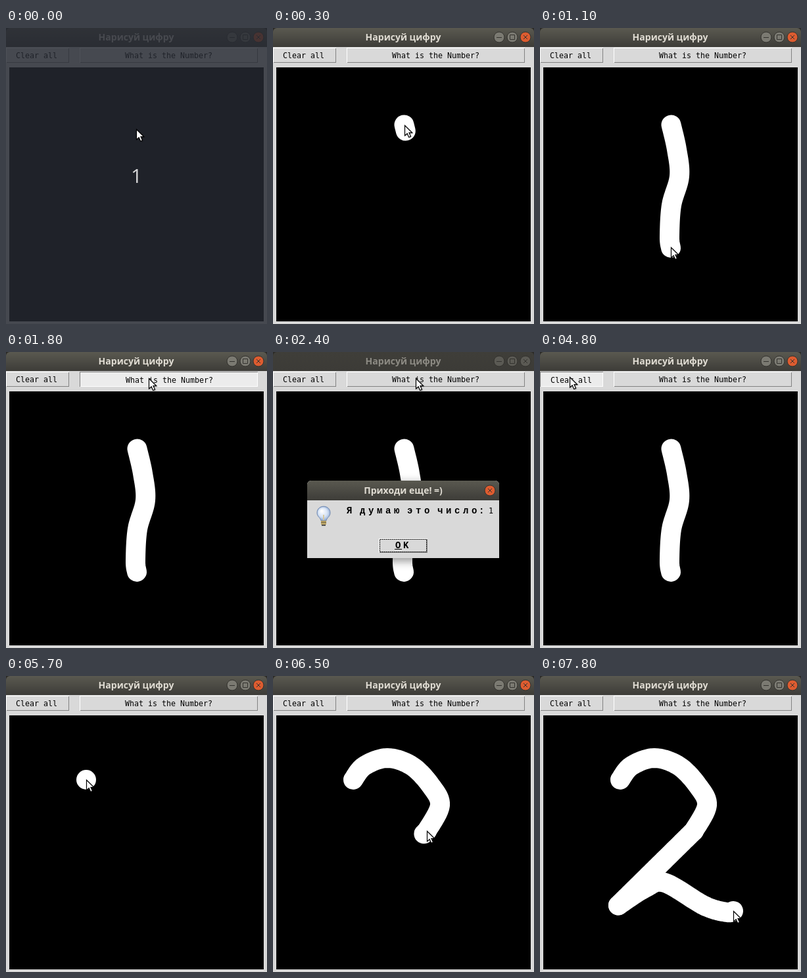
These frames come from a looping animation (397 by 451 pixels, 8 s). An HTML page with a canvas:

```html
<!DOCTYPE html>
<html lang="ru">
<head>
<meta charset="utf-8">
<style>
  html, body { margin: 0; width: 100%; height: 100%; overflow: hidden; background: #d9d9d9; }
  canvas { display: block; }
</style>
</head>
<body>
<canvas id="stage" width="397" height="451"></canvas>
<script>
const ctx = document.getElementById('stage').getContext('2d');
const LOOP = 8000, STEP = 100, CURSOR_LAG = 100;
const ASK_DOWN = 1800, DIALOG_OPEN = 2300, OK_DOWN = 3500, DIALOG_CLOSE = 3700;
const CLEAR_DOWN = 4800, CLEARED = 5000;
const PANEL = '#d9d9d9', HOVER = '#ececec', BRUSH = 30;
const TITLE_FONT = 'bold 14px "Open Sans", "Noto Sans", sans-serif';
const BUTTON_FONT = '11.63px "DejaVu Sans Mono", monospace';
const MESSAGE_FONT = 'bold 14px "Liberation Mono", monospace';
const CLEAR = { x: 0, y: 30, w: 96, h: 23 };
const ASK = { x: 112, y: 30, w: 271, h: 23 };
const OK = { x: 161, y: 284, w: 74, h: 22 };

const linear = k => k;
const easeOut = k => 1 - (1 - k) ** 2;
const easeInOut = k => (1 - Math.cos(Math.PI * k)) / 2;

// Each move continues from the point where the previous one ended
const moves = [];
let last = [198, 154];
function move(from, to, ease, ink, ...points) {
  moves.push({ from, to, ease, ink, points: [last, ...points] });
  last = points[points.length - 1];
}

move(0, 200, linear, false, [199.5, 147.5]);
move(250, 1020, linear, true, [208, 185], [212, 226], [200, 270], [197, 318], [199, 335]);
move(1200, 1700, easeInOut, false, [217, 40]);
move(2400, 3400, easeOut, false, [201, 288]);
move(3600, 4300, easeInOut, false, [165, 71]);
move(4400, 4700, easeOut, false, [45, 38]);
move(4900, 5600, easeInOut, false, [122, 158]);
move(5700, 6400, linear, true, [139, 137], [174, 125], [211, 137], [240, 167], [254, 197], [234, 236]);
move(6400, 7000, easeInOut, true, [119, 349.5]);
move(7100, 7700, linear, true, [160, 323], [190, 315], [250, 350], [284, 360], [294, 358]);

// Catmull-Rom curve through the points, k from 0 to 1
function curve(points, k) {
  const n = points.length - 1;
  const i = Math.min(Math.floor(k * n), n - 1), u = k * n - i;
  const [a, b, c, d] = [i - 1, i, i + 1, i + 2].map(j => points[Math.max(0, Math.min(n, j))]);
  return [0, 1].map(j => b[j] + u / 2 * (c[j] - a[j]
    + u * (2 * a[j] - 5 * b[j] + 4 * c[j] - d[j] + u * (3 * (b[j] - c[j]) + d[j] - a[j]))));
}

function progress({ from, to, ease }, t) {
  return ease(Math.max(0, Math.min(1, (t - from) / (to - from))));
}

function pointerAt(t) {
  const current = moves.filter(m => m.from <= t).pop() || moves[0];
  return curve(current.points, progress(current, t));
}

function inside([x, y], r) {
  return x >= r.x && x < r.x + r.w && y >= r.y && y < r.y + r.h;
}

function rect(x, y, w, h, color) {
  ctx.fillStyle = color;
  ctx.fillRect(x, y, w, h);
}

function text(str, x, y, font, color, align = 'left') {
  ctx.font = font;
  ctx.fillStyle = color;
  ctx.textAlign = align;
  ctx.fillText(str, x, y);
}

function bevel({ x, y, w, h }, fill, sunken) {
  rect(x, y, w, h, sunken ? '#828282' : '#fff');
  rect(x + 1, y + 1, w - 1, h - 1, sunken ? '#fff' : '#828282');
  rect(x + 1, y + 1, w - 2, h - 2, fill);
}

function button(box, label, x, hovered, pressed) {
  bevel(box, hovered || pressed ? HOVER : PANEL, pressed);
  const d = pressed ? 1 : 0;
  text(label, x + d, 46 + d, BUTTON_FONT, '#000');
}

function titleBar(x, y, w, h, focused) {
  const g = ctx.createLinearGradient(0, y, 0, y + h);
  g.addColorStop(0, focused ? '#5a5950' : '#3f3e39');
  g.addColorStop(1, focused ? '#3d3c38' : '#3c3b37');
  ctx.fillStyle = g;
  ctx.beginPath();
  ctx.roundRect(x, y, w, h, [6, 6, 0, 0]);
  ctx.fill();
}

function windowButton(x, y, kind, focused) {
  const hot = kind === 'close' && focused;
  ctx.beginPath();
  ctx.arc(x, y, 8, 0, Math.PI * 2);
  ctx.fillStyle = hot ? '#dd5c30' : focused ? '#7b7a72' : '#5b5a54';
  ctx.fill();
  ctx.strokeStyle = '#33322e';
  ctx.lineWidth = 1;
  ctx.stroke();
  ctx.beginPath();
  if (kind === 'min') {
    ctx.moveTo(x - 4, y + .5);
    ctx.lineTo(x + 4, y + .5);
  } else if (kind === 'max') {
    ctx.rect(x - 3.5, y - 3.5, 7, 7);
  } else {
    ctx.moveTo(x - 3, y - 3); ctx.lineTo(x + 3, y + 3);
    ctx.moveTo(x + 3, y - 3); ctx.lineTo(x - 3, y + 3);
  }
  ctx.stroke();
}

function brushStroke(m, t) {
  const k = progress(m, t);
  ctx.beginPath();
  ctx.moveTo(...m.points[0]);
  for (let i = 0; i <= 60; i++) ctx.lineTo(...curve(m.points, k * i / 60));
  ctx.strokeStyle = '#fff';
  ctx.lineWidth = BRUSH;
  ctx.lineCap = ctx.lineJoin = 'round';
  ctx.stroke();
  ctx.lineCap = 'butt';
  ctx.lineJoin = 'miter';
}

function mainWindow(t, cursor, modal) {
  const focused = !modal;
  rect(0, 0, 397, 29, '#2b2a27');
  rect(0, 29, 397, 422, PANEL);
  titleBar(0, 0, 397, 29, focused);
  text('Нарисуй цифру', 198, 19, TITLE_FONT, focused ? '#dfdbd2' : '#8d8b84', 'center');
  ['min', 'max', 'close'].forEach((kind, i) => windowButton(344 + 20 * i, 14, kind, focused));
  button(CLEAR, 'Clear all', 15, focused && inside(cursor, CLEAR), t >= CLEAR_DOWN && t < CLEARED);
  button(ASK, 'What is the Number?', 181, focused && inside(cursor, ASK), t >= ASK_DOWN && t < DIALOG_OPEN);
  rect(5, 60, 387, 387, '#000');
  const wipe = t < CLEARED ? 0 : CLEARED;
  for (const m of moves) if (m.ink && m.from >= wipe && m.from <= t) brushStroke(m, t);
}

function bulb() {
  const g = ctx.createRadialGradient(74, 242, 1, 77, 246, 11);
  g.addColorStop(0, '#fff');
  g.addColorStop(.6, '#d5e2f4');
  g.addColorStop(1, '#8aa6d0');
  ctx.beginPath();
  ctx.moveTo(73, 257);
  ctx.bezierCurveTo(72, 252, 67, 251, 67, 245);
  ctx.bezierCurveTo(67, 232, 87, 232, 87, 245);
  ctx.bezierCurveTo(87, 251, 82, 252, 81, 257);
  ctx.closePath();
  ctx.fillStyle = g;
  ctx.fill();
  ctx.strokeStyle = '#7189b0';
  ctx.lineWidth = 1;
  ctx.stroke();
  rect(76, 248, 2, 8, '#d8c9a0');
  rect(73, 257, 8, 6, '#b9a468');
  rect(73, 259, 8, 1, '#74643c');
  rect(74, 263, 6, 2, '#555');
}

function dialogContent(t, cursor) {
  bulb();
  // Wide Cyrillic cells, narrow spaces
  ctx.letterSpacing = '4.6px';
  ctx.wordSpacing = '-6px';
  text('Я думаю это число', 112, 246, MESSAGE_FONT, '#000');
  ctx.letterSpacing = ctx.wordSpacing = '0px';
  text(':', 313, 246, MESSAGE_FONT, '#000');
  text('1', 328, 246, BUTTON_FONT, '#000');

  const pressed = t >= OK_DOWN, d = pressed ? 1 : 0;
  bevel(OK, pressed || inside(cursor, OK) ? HOVER : PANEL, pressed);
  ctx.strokeStyle = '#000';
  ctx.lineWidth = 1;
  ctx.setLineDash([2, 1]);
  ctx.strokeRect(OK.x + 1.5, OK.y + 1.5, OK.w - 3, OK.h - 3);
  ctx.setLineDash([]);
  ctx.letterSpacing = '3.6px';
  text('OK', 186 + d, 299 + d, MESSAGE_FONT, '#000');
  ctx.letterSpacing = '0px';
  rect(185 + d, 300 + d, 11, 1, '#000');
}

function dialog(t, cursor) {
  const opening = t === DIALOG_OPEN, closing = t >= DIALOG_CLOSE;
  const settled = !opening && !closing;
  ctx.save();
  ctx.translate(0, 255);
  ctx.scale(1, opening ? .5 : closing ? .983 : 1);
  ctx.translate(0, -255);
  if (settled) {
    ctx.shadowColor = 'rgba(0,0,0,.45)';
    ctx.shadowBlur = 14;
    ctx.shadowOffsetY = 4;
  }
  ctx.beginPath();
  ctx.roundRect(52, 196, 292, 118, [6, 6, 0, 0]);
  ctx.fillStyle = PANEL;
  ctx.fill();
  ctx.shadowColor = 'transparent';
  titleBar(52, 196, 292, 30, true);
  text('Приходи еще! =)', 198, 216, TITLE_FONT, '#dfdbd2', 'center');
  windowButton(330, 211, 'close', true);
  if (settled) dialogContent(t, cursor);
  ctx.restore();
}

function countdown(alpha) {
  ctx.globalAlpha = alpha;
  rect(0, 0, 397, 451, '#272a32');
  text('1', 198.5, 236, '30px "Open Sans", "Noto Sans", sans-serif', '#fff', 'center');
  ctx.globalAlpha = 1;
}

function drawCursor([x, y]) {
  ctx.save();
  ctx.translate(Math.round(x) + .5, Math.round(y) + .5);
  ctx.beginPath();
  ctx.moveTo(0, 0);
  for (const [px, py] of [[0, 15.5], [3.7, 12.2], [6.2, 18], [9, 16.8], [6.5, 11.2], [11.3, 11.2]])
    ctx.lineTo(px, py);
  ctx.closePath();
  ctx.shadowColor = 'rgba(0,0,0,.4)';
  ctx.shadowBlur = 2;
  ctx.shadowOffsetX = ctx.shadowOffsetY = 1;
  ctx.fillStyle = '#fff';
  ctx.fill();
  ctx.shadowColor = 'transparent';
  ctx.strokeStyle = '#000';
  ctx.lineWidth = 1.2;
  ctx.stroke();
  ctx.restore();
}

function draw(now) {
  const t = Math.floor((now % LOOP) / STEP) * STEP;
  const cursor = pointerAt(t - CURSOR_LAG);
  mainWindow(t, cursor, t >= DIALOG_OPEN && t < DIALOG_CLOSE);
  if (t >= DIALOG_OPEN && t <= DIALOG_CLOSE) dialog(t, cursor);
  if (t < 200) countdown(t < 100 ? .82 : .3);
  drawCursor(cursor);
}

const start = performance.now();
function tick() {
  draw(performance.now() - start);
  requestAnimationFrame(tick);
}
tick();
</script>
</body>
</html>
```
